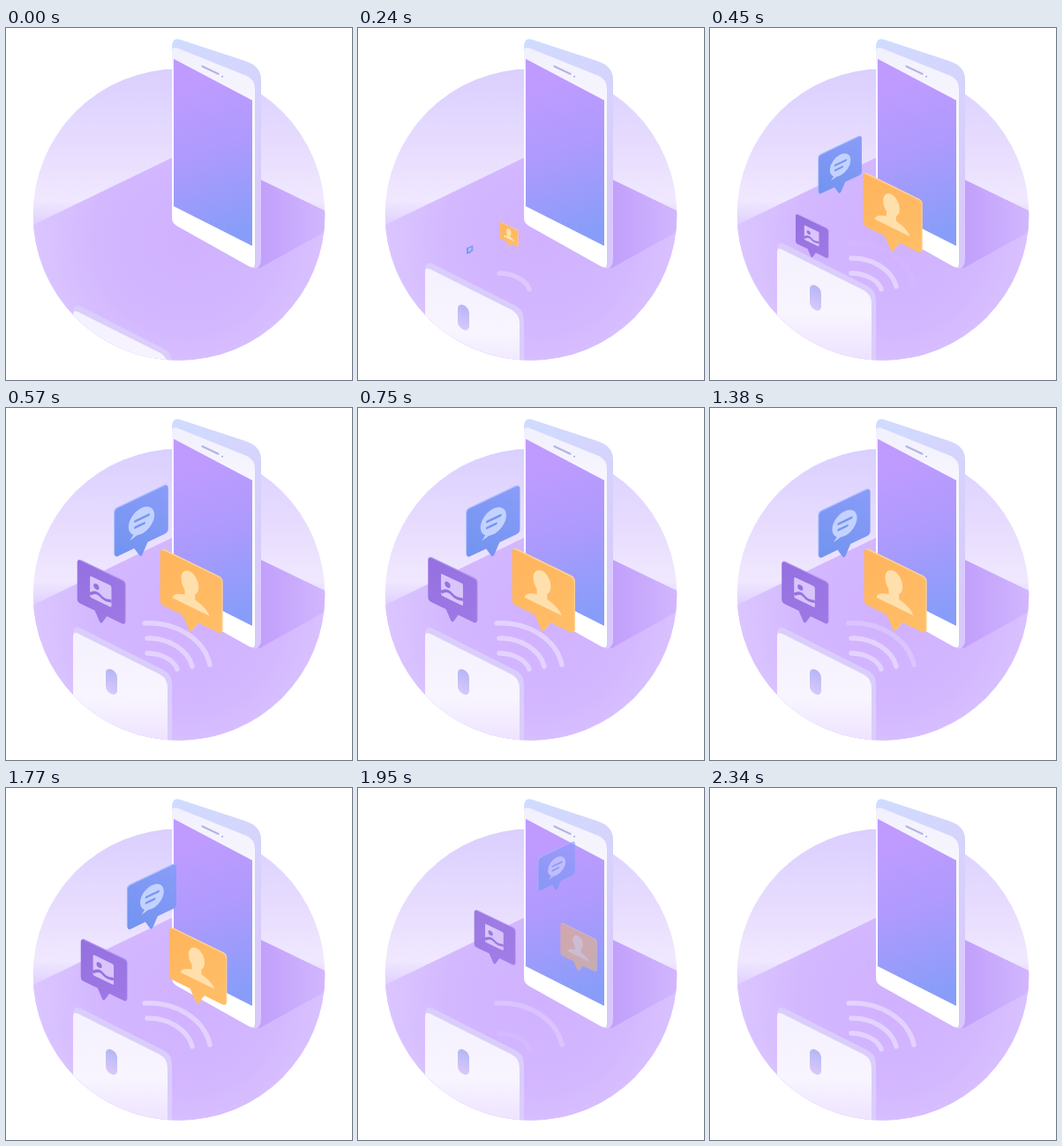
An HTML page for the animation above (2.4 s loop, 392 px wide and 399 px high).

```html
<!DOCTYPE html>
<html lang="en">
<head>
<meta charset="utf-8">
<title>Phone sharing</title>
<style>
  html, body { margin: 0; width: 100%; height: 100%; overflow: hidden; background: #fff; }
  svg { display: block; width: 100vw; height: 100vh; }
  .wave { fill: none; stroke: #fff; stroke-opacity: .4; stroke-width: 5.5; stroke-linecap: round; }
</style>
</head>
<body>
<svg viewBox="0 0 392 399">
  <defs>
    <clipPath id="disc"><circle cx="196" cy="211.5" r="165.3"/></clipPath>
    <linearGradient id="wall" x2="0" y2="1">
      <stop offset="0" stop-color="#dacfff"/>
      <stop offset=".28" stop-color="#e8ddfe"/>
      <stop offset=".45" stop-color="#f0e8ff"/>
      <stop offset=".56" stop-color="#dcc8ff"/>
    </linearGradient>
    <radialGradient id="floor" gradientUnits="userSpaceOnUse" cx="205" cy="240" r="185">
      <stop offset="0" stop-color="#d0b1ff"/>
      <stop offset=".55" stop-color="#d3b7ff"/>
      <stop offset="1" stop-color="#dcc8ff"/>
    </radialGradient>
    <linearGradient id="shade">
      <stop offset="0" stop-color="#c09ffb"/>
      <stop offset="1" stop-color="#c9abfd" stop-opacity=".5"/>
    </linearGradient>
    <linearGradient id="rim" x2=".3" y2="1">
      <stop offset="0" stop-color="#cfdcff"/>
      <stop offset=".4" stop-color="#d5d4fd"/>
      <stop offset="1" stop-color="#d9c8fb"/>
    </linearGradient>
    <linearGradient id="face" x2="0" y2="1">
      <stop offset="0" stop-color="#f1f0fd"/>
      <stop offset=".6" stop-color="#fff"/>
    </linearGradient>
    <linearGradient id="screen" gradientUnits="userSpaceOnUse" x1="205" y1="65" x2="258" y2="232">
      <stop offset="0" stop-color="#bf9bff"/>
      <stop offset=".45" stop-color="#ae9afd"/>
      <stop offset="1" stop-color="#889df9"/>
    </linearGradient>
    <linearGradient id="lid" x2="0" y2="1">
      <stop offset=".1" stop-color="#f5f2ff"/>
      <stop offset=".5" stop-color="#f8f5ff"/>
      <stop offset=".85" stop-color="#eee3ff"/>
    </linearGradient>
    <linearGradient id="button" x2="0" y2="1">
      <stop offset="0" stop-color="#b5b6f6"/>
      <stop offset="1" stop-color="#d8c9fa"/>
    </linearGradient>
    <linearGradient id="blueFill" x1="1" x2="0" y2="1">
      <stop offset="0" stop-color="#8b9cf9"/>
      <stop offset="1" stop-color="#6d93ee"/>
    </linearGradient>
    <linearGradient id="orangeFill" x2="1" y2="1">
      <stop offset="0" stop-color="#ffb45c"/>
      <stop offset="1" stop-color="#ffc069"/>
    </linearGradient>
    <linearGradient id="purpleFill" x2="1" y2="1">
      <stop offset="0" stop-color="#9470e0"/>
      <stop offset="1" stop-color="#a07ae6"/>
    </linearGradient>
    <path id="body" d="M-26-27H26Q30-27 30-23V23Q30 27 26 27H7L1 38Q-.5 40-2 38L-8 27H-26Q-30 27-30 23V-23Q-30-27-26-27Z"/>
  </defs>

  <g clip-path="url(#disc)">
    <rect x="30" y="46" width="332" height="332" fill="url(#wall)"/>
    <path d="M30 223.500L213 135L362 207.500V380H30Z" fill="url(#floor)"/>
    <path d="M286 273L362 230.500V207.500L286 171Z" fill="url(#shade)"/>
  </g>

  <g id="phone">
    <path d="M188 22Q188 10 197 13L270 37Q289 43 289 58V263Q289 272 281 273L230 235Z" fill="url(#rim)"/>
    <path d="M188 28Q188 20 195 23L272 54Q282 58 282 69V267Q282 274 275 270L193 224Q188 221 188 215Z" fill="url(#face)"/>
    <path d="M190 35L279 82V247L190 202Z" fill="url(#screen)"/>
    <path d="M222.500 43.500L240.500 52M245 55h.1" fill="none" stroke="#b6b4dc" stroke-width="2.200" stroke-linecap="round"/>
  </g>

  <path class="wave" d="M160 278C175 278 190 285 194 296"/>
  <path class="wave" d="M160 261C182 260 206 273 211 293"/>
  <path class="wave" d="M157 244C190 242 224 260 231 291"/>

  <g id="purple">
    <use href="#body" x="1" y="-1.500" fill="#b093f0"/>
    <use href="#body" fill="url(#purpleFill)"/>
    <rect x="-14" y="-14" width="27" height="27" rx="2" fill="#d9c5fb"/>
    <circle cx="-6" cy="-4" r="3.500" fill="#9671e1"/>
    <path d="M-14 9Q-6 1-1 5T13 5" fill="none" stroke="#9671e1" stroke-width="3.500"/>
  </g>
  <g id="blue">
    <use href="#body" x="-1" y="-1.500" fill="#a5bcff"/>
    <use href="#body" fill="url(#blueFill)"/>
    <path d="M-8 10L-13 16L-2 13Z" fill="#c3d2ff"/>
    <circle r="14.500" fill="#c3d2ff"/>
    <path d="M-7-3H8M-7 4H3" stroke="#7896f2" stroke-width="2.800" stroke-linecap="round"/>
  </g>
  <g id="orange">
    <use href="#body" x="1" y="-1.500" fill="#ffd294"/>
    <use href="#body" fill="url(#orangeFill)"/>
    <path d="M-18 15Q-17 9-6 6V-1H4V6Q16 9 18 15Z" fill="#ffe0ac"/>
    <ellipse cx="-1" cy="-8" rx="8.500" ry="11" fill="#ffe0ac"/>
  </g>

  <g clip-path="url(#disc)">
    <g id="device">
      <path d="M76 400V255Q76 246 85 250L178 297Q188 302 188 313V400Z" fill="#dacdfb"/>
      <path d="M76 400V259Q76 253 82 256L174 302Q183 307 183 317V400Z" fill="url(#lid)"/>
      <rect x="-6.500" y="-14" width="13" height="28" rx="6.500" transform="matrix(1 .4 0 1 119.500 310.500)" fill="url(#button)"/>
    </g>
  </g>
</svg>

<script>
const LOOP = 2400, WAVE_PERIOD = 880;
const byId = id => document.getElementById(id);
const clamp = v => Math.min(1, Math.max(0, v));
const smooth = u => u * u * (3 - 2 * u);

// Keys: [time, centre x, centre y, scale]; the last leg also fades out.
const bubbles = [
  { id: 'blue', skew: -.475, keys: [[150, 123, 268, 0], [570, 153.5, 128, 1.01],
    [1080, 153, 130, .99], [1400, 152.5, 131, .97], [1680, 152.5, 131, .97], [2070, 246, 76.500, .61]] },
  { id: 'orange', skew: .49, keys: [[90, 155, 245, 0], [510, 209.5, 208, 1.165],
    [1080, 210, 206.5, 1.18], [1400, 209.5, 207.5, 1.165], [1680, 209.5, 207.5, 1.165], [2040, 257, 176, .59]] },
  { id: 'purple', skew: .48, keys: [[195, 132, 295, 0], [615, 107, 206, .93],
    [1080, 107, 209, .89], [1400, 107.5, 209.5, .875], [1720, 107.5, 209.5, .875], [2160, 195.5, 135.5, .68]] }
];
const deviceKeys = [[0, 66], [390, -6], [600, 0]];
const waves = [...document.querySelectorAll('.wave')];

function sample(keys, t) {
  let i = 0;
  while (i < keys.length - 2 && t >= keys[i + 1][0]) i++;
  const [from, to] = [keys[i], keys[i + 1]];
  const p = smooth(clamp((t - from[0]) / (to[0] - from[0])));
  return { p, last: i === keys.length - 2, values: from.slice(1).map((v, n) => v + (to[n + 1] - v) * p) };
}

// Arcs light up from the inside out, then go dark in the same order.
function waveAlpha(i, t) {
  let alpha = 0;
  for (let start = 170; start < t; start += WAVE_PERIOD) {
    const on = clamp((t - start - i * 135) / 110);
    const off = clamp((t - start - 610 - i * 120) / 110);
    alpha = Math.max(alpha, on - off);
  }
  return alpha;
}

function draw(now) {
  const t = now % LOOP;
  for (const { id, skew, keys } of bubbles) {
    const { p, last, values: [x, y, s] } = sample(keys, t);
    byId(id).setAttribute('transform', `matrix(${s} ${s * skew} 0 ${s} ${x} ${y})`);
    byId(id).setAttribute('opacity', last ? 1 - p ** 4 : 1);
  }
  byId('device').setAttribute('transform', `translate(0 ${sample(deviceKeys, t).values[0]})`);
  waves.forEach((wave, i) => wave.setAttribute('opacity', waveAlpha(i, t)));
}

const begin = performance.now();
function tick() {
  draw(performance.now() - begin);
  requestAnimationFrame(tick);
}
tick();
</script>
</body>
</html>
```
